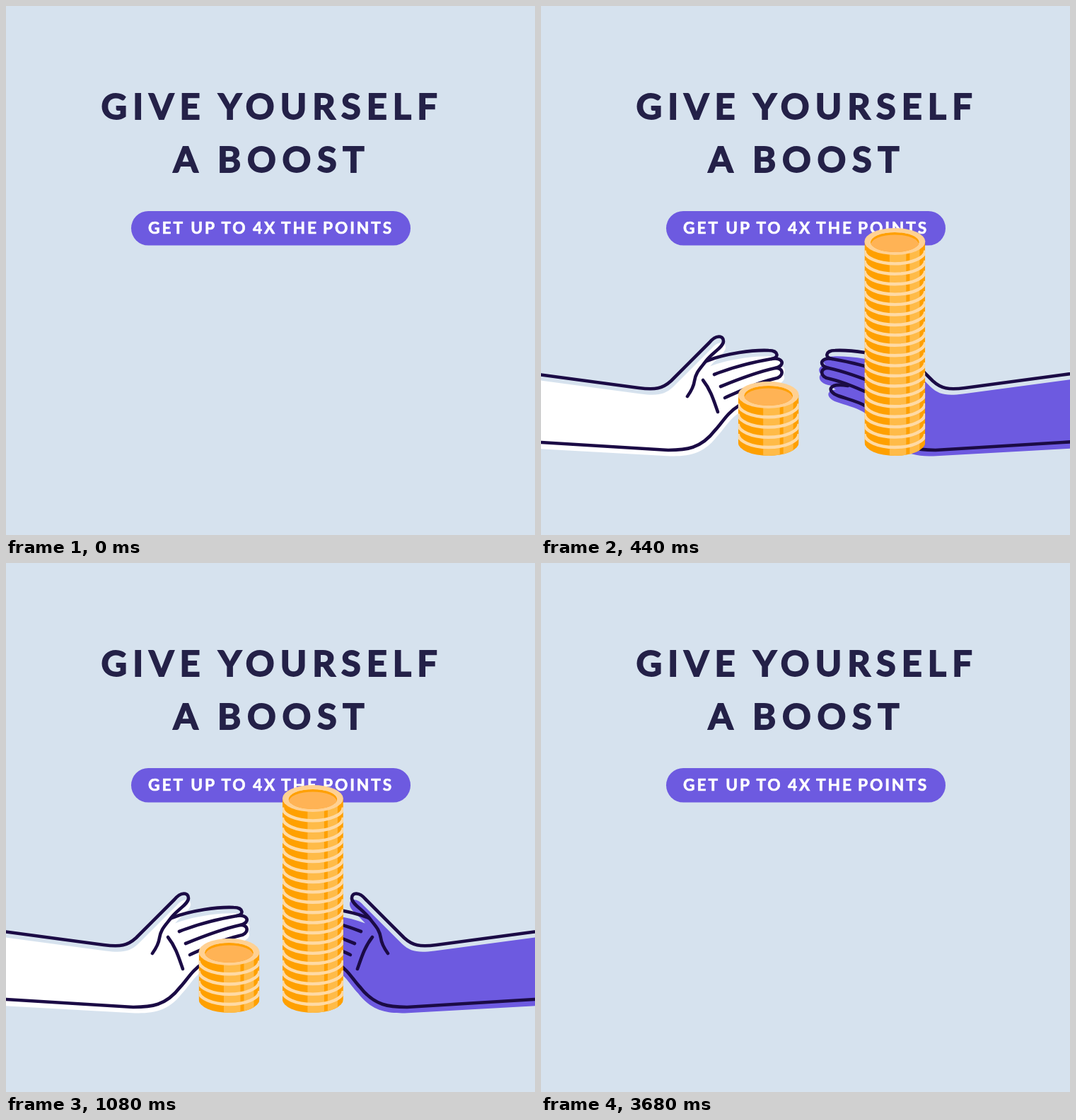
Write an HTML page that moves like this. It is 748x748 px and loops after 3960 ms.

```html
<!DOCTYPE html>
<html lang="en">
<head>
<meta charset="utf-8">
<title>Give yourself a boost</title>
<style>
  html, body { margin: 0; width: 100%; height: 100%; overflow: hidden; background: #d6e2ee; }
  svg { display: block; width: 100%; height: 100%; }
  text { font-family: Lato, "Open Sans", sans-serif; font-weight: 700; text-anchor: middle; }
  .title { font-size: 50.5px; letter-spacing: 8.1px; fill: #242148; stroke: #242148; stroke-width: 1.8px; }
  .wide { letter-spacing: 8.7px; }
  .label { font-size: 22.7px; letter-spacing: 2.9px; fill: #fff; stroke: #fff; stroke-width: .7px; }
  .line { fill: none; stroke: #1b0b45; stroke-width: 4.6; stroke-linecap: round; stroke-linejoin: round; }
</style>
</head>
<body>
<svg viewBox="0 0 748 748">
  <defs>
    <path id="skin" d="M-80 511 L0 521.5 L138 540 C162 543 172 541 184 530
      L238 476 C247 465 258 465 258 474 C258 482 246 489 236 501
      C262 491 300 486 322 487 C336 487 338 495 332 499 C342 500 344 507 339 512
      C344 517 340 526 326 528 L318 534 C332 535 332 545 318 551
      C304 556 290 559 280 565 C262 576 256 590 246 600 C226 626 205 628 180 628 L0 618 L-80 614 Z"/>
    <g id="ink" class="line">
      <path d="M-80 511 L0 521.5 L138 540 C162 543 172 541 184 530 L238 476
        C247 465 258 465 258 474 C258 482 244 489 234 501 C224 514 219 518 217 530 C216 538 212 545 207 552"/>
      <path d="M234 502 C262 491 300 486 322 487 C336 487 337 498 326 499 C296 504 268 512 245 521"/>
      <path d="M326 499 C343 496 346 509 331 512 C303 518 276 529 254 538"/>
      <path d="M331 512 C344 511 344 525 330 527 C305 533 282 544 260 554"/>
      <path d="M304 537 C332 532 334 545 318 551 C304 556 290 559 280 565
        C262 576 256 590 246 600 C226 626 205 628 180 628 L0 617 L-80 612"/>
      <path d="M229 529 C240 543 244 557 250 574"/>
    </g>
  </defs>

  <text class="title" x="208.5" y="159.5">GIVE</text>
  <text class="title" x="459" y="159.5">YOURSELF</text>
  <text class="title wide" x="258.5" y="234.5">A</text>
  <text class="title wide" x="407.2" y="234.5">BOOST</text>

  <rect x="177" y="290" width="395" height="48.5" rx="24.25" fill="#6d5ae0"/>
  <g class="label">
    <text x="227" y="322">GET</text>
    <text x="279.5" y="322">UP</text>
    <text x="323" y="322">TO</text>
    <text x="366" y="322">4X</text>
    <text x="415.5" y="322">THE</text>
    <text x="498" y="322">POINTS</text>
  </g>

  <g id="leftHand">
    <use href="#skin" x="3" y="8.5" fill="#fff"/>
    <use href="#ink"/>
  </g>
  <g id="rightHand">
    <g transform="translate(747 0) scale(-1 1)">
      <use href="#skin" x="3" y="8.5" fill="#6d5ae0"/>
      <use href="#ink"/>
    </g>
  </g>
  <g id="smallStack"></g>
  <g id="tallStack"></g>
</svg>
<script>
  const LOOP = 3960, STEP = 40, TRAVEL = 374, EXIT = 160;
  const $ = id => document.getElementById(id);

  function buildStack(id, cx, top, coins) {
    const base = 617, gap = (base - top - 10) / (coins - 1);
    const band = (x, w) => `<rect x="${x}" y="${top}" width="${w}" height="${base - top + 20}" fill="#ffbb48"/>`;
    let rims = '';
    for (let i = 1; i < coins; i++) {
      rims += `<path d="M-43 ${top + i * gap - 2} a43 19 0 0 0 86 0"/>`;
    }
    $(id).innerHTML = `
      <clipPath id="${id}Body"><path d="M-43 ${top} V${base} A43 19 0 0 0 43 ${base} V${top} Z"/></clipPath>
      <clipPath id="${id}Face"><ellipse cy="${top + 1}" rx="34.5" ry="14"/></clipPath>
      <g transform="translate(${cx} 0)">
        <g clip-path="url(#${id}Body)">
          <rect x="-43" y="${top}" width="86" height="${base - top + 20}" fill="#ffa000"/>
          ${band(-7.5, 23.5)}${band(21, 14)}
          <g fill="none" stroke="#ffdaa4" stroke-width="4.4">${rims}</g>
        </g>
        <ellipse cy="${top}" rx="43" ry="19" fill="#ffd193"/>
        <g clip-path="url(#${id}Face)">
          <ellipse cy="${top + 1}" rx="34.5" ry="14" fill="#ffa000"/>
          <ellipse cy="${top + 4.5}" rx="34" ry="14" fill="#ffb355"/>
        </g>
      </g>`;
  }
  buildStack('smallStack', 315.5, 550, 5);
  buildStack('tallStack', 434, 333, 20);

  // Underdamped spring falling from 1 to 0
  function spring(t) {
    if (t <= 0) return 1;
    const w = 0.01282, k = 0.837;
    return Math.exp(-k * w * t) * (Math.cos(w * t) + k * Math.sin(w * t));
  }

  const parts = [
    { el: $('leftHand'), side: -1, start: 18, leave: 3515 },
    { el: $('smallStack'), side: -1, start: 73, leave: 3483 },
    { el: $('rightHand'), side: 1, start: 252, leave: 3483 },
    { el: $('tallStack'), side: 1, start: 309, leave: 3515 }
  ];

  function draw(now) {
    const t = Math.floor(now % LOOP / STEP) * STEP;
    for (const { el, side, start, leave } of parts) {
      const out = Math.max(0, t - leave) / EXIT;
      const x = side * TRAVEL * (spring(t - start) + out * out);
      el.setAttribute('transform', `translate(${x.toFixed(2)} 0)`);
    }
  }

  let begin;
  function tick(now) {
    begin ??= now;
    draw(now - begin);
    requestAnimationFrame(tick);
  }
  draw(0);
  requestAnimationFrame(tick);
</script>
</body>
</html>
```
